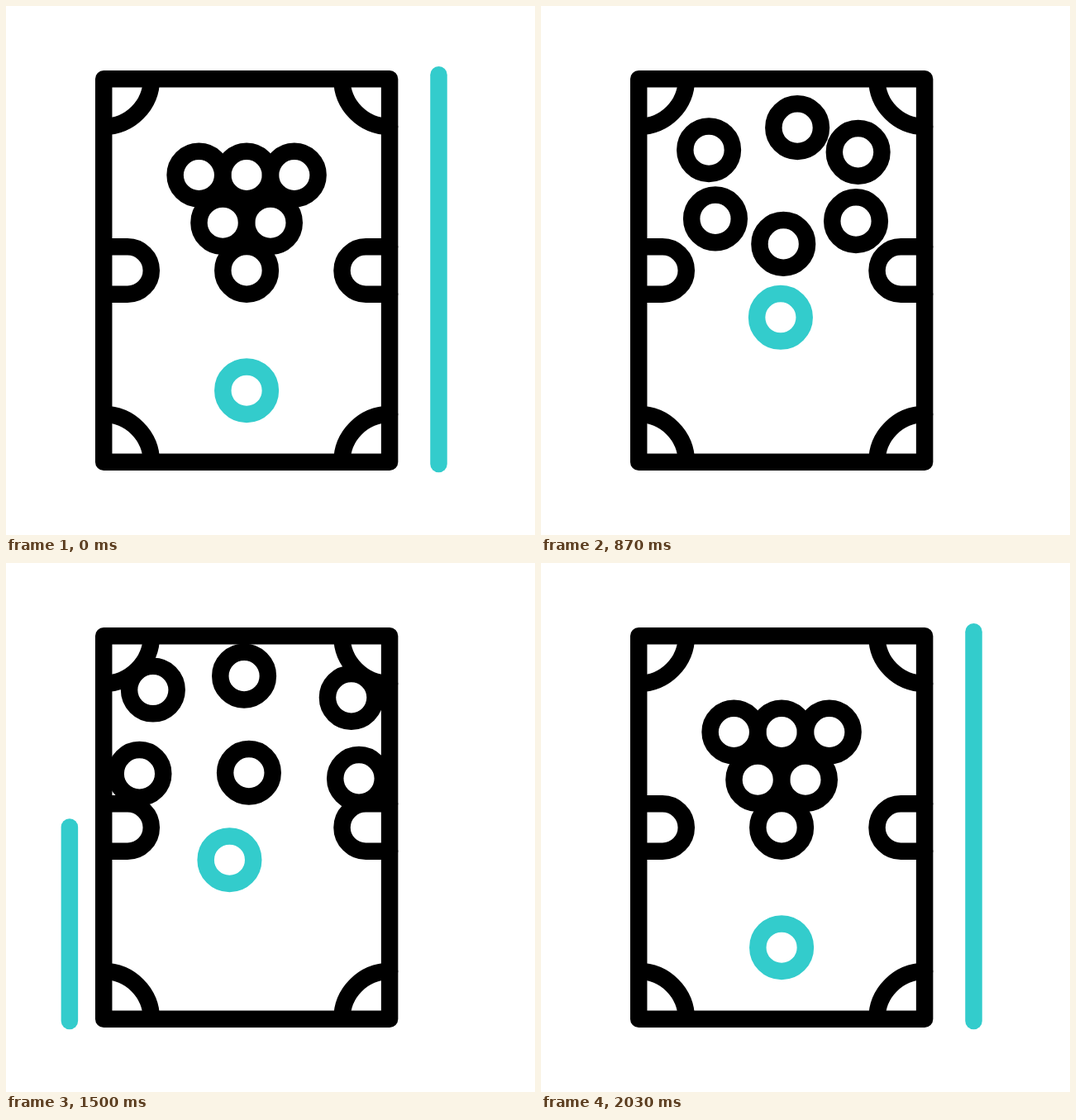
These frames come from a looping animation (640x640 px, 2.07 s). An HTML page with a canvas:

```html
<!DOCTYPE html>
<html lang="en">
<head>
<meta charset="utf-8">
<title>Billiard table</title>
<style>
html, body { margin: 0; width: 100%; height: 100%; overflow: hidden; background: #fff; }
canvas { display: block; width: 100vmin; height: 100vmin; margin: auto; }
</style>
</head>
<body>
<canvas id="stage"></canvas>
<script>
const canvas = document.getElementById('stage');
const ctx = canvas.getContext('2d');
const SIZE = 640, LOOP = 2070, LAST = 61;
const BLACK = '#000', TEAL = '#33cccc';
const LINE = 20.5, BALL_R = 28.8, PITCH = 57.7;
const LEFT = 118.2, RIGHT = 464.1, TOP = 88.3, BOTTOM = 551.7, MIDDLE = 320;
const CUE_TOP = 83.2, CUE_BOTTOM = 554.1, CUE_LEFT = 76.9, CUE_RIGHT = 523.5;
const RAIL = TOP + BALL_R + LINE / 2;
const LAG = 0.015;

const mix = (a, b, p) => a + (b - a) * p;
const mixPoint = (a, b, p) => [mix(a[0], b[0], p), mix(a[1], b[1], p)];
const bend = (a, b, c, p) => mixPoint(mixPoint(a, b, p), mixPoint(b, c, p), p);
const clamp = v => Math.min(1, Math.max(0, v));
const ease = v => (1 - Math.cos(Math.PI * clamp(v))) / 2;

// Racked balls, top row first
const rack = [];
for (let row = 0; row < 3; row++) {
  for (let i = 0; i < 3 - row; i++) {
    rack.push([291.1 + (i - (2 - row) / 2) * PITCH, 204.5 + row * PITCH]);
  }
}

// Where each ball bends towards, and where it would stop without the rail
const rolls = [
  { via: [202, 170.5], end: [176, 152.2] },
  { via: [332.4, 134.5], end: [284.8, 116.7] },
  { via: [382, 170.7], end: [420.5, 162.2] },
  { via: [213, 256.4], end: [157.5, 254.8] },
  { via: [386, 258.7], end: [430.2, 261] },
  { via: [294, 291], end: [293.9, 250.9] }
];

function ballAt(i, n) {
  const p = ease(Math.pow(clamp((n - 13) / 39.4), 0.62));
  const [x, y] = bend(rack[i], rolls[i].via, rolls[i].end, p);
  return [x, y < RAIL ? 2 * RAIL - y : y];
}

function cueBallAt(n) {
  const hit = [293.3, 382.5];
  if (n < 14.4) return mixPoint([291.1, 465.2], hit, ease((n - 8.8) / 5.6));
  return bend(hit, [284, 364.4], [262, 355], ease((n - 14.4) / 43.6));
}

function stroke(color, draw) {
  ctx.strokeStyle = color;
  ctx.beginPath();
  draw();
  ctx.stroke();
}

function drawTable() {
  const quarter = Math.PI / 2;
  stroke(BLACK, () => ctx.rect(LEFT, TOP, RIGHT - LEFT, BOTTOM - TOP));
  [[LEFT, TOP], [RIGHT, TOP], [RIGHT, BOTTOM], [LEFT, BOTTOM]].forEach(([x, y], i) =>
    stroke(BLACK, () => ctx.arc(x, y, PITCH, i * quarter, (i + 1) * quarter)));
  [[LEFT, 1], [RIGHT, -1]].forEach(([x, dir]) => stroke(BLACK, () => {
    ctx.moveTo(x, MIDDLE - BALL_R);
    ctx.arc(x + dir * BALL_R, MIDDLE, BALL_R, -quarter, quarter, dir < 0);
    ctx.lineTo(x, MIDDLE + BALL_R);
  }));
}

function ring([x, y], color) {
  stroke(color, () => ctx.arc(x, y, BALL_R, 0, 2 * Math.PI));
}

function drawBalls(n, from, to) {
  ctx.save();
  ctx.beginPath();
  ctx.rect(from, 0, to - from, SIZE);
  ctx.clip();
  rack.forEach((_, i) => ring(ballAt(i, n), BLACK));
  ring(cueBallAt(n), TEAL);
  ctx.restore();
}

function drawCue(x, top) {
  if (top > CUE_BOTTOM - 0.1) return;
  stroke(TEAL, () => {
    ctx.moveTo(x, top);
    ctx.lineTo(x, CUE_BOTTOM);
  });
}

function render(n) {
  const scale = canvas.width / SIZE;
  ctx.setTransform(scale, 0, 0, scale, 0, 0);
  ctx.fillStyle = '#fff';
  ctx.fillRect(0, 0, SIZE, SIZE);
  ctx.lineWidth = LINE;
  ctx.lineCap = ctx.lineJoin = 'round';
  drawTable();

  if (n < 39) {
    drawBalls(n, 0, SIZE);
    drawCue(CUE_RIGHT, mix(CUE_TOP, CUE_BOTTOM, ease(n / 11.85)));
    return;
  }
  // The returning cue wipes the table back to the racked state
  const x = mix(CUE_LEFT, CUE_RIGHT, ease((n - 47 - LAG) / 14));
  drawBalls(0, 0, x);
  drawBalls(n, x, SIZE);
  drawCue(x, mix(CUE_BOTTOM, CUE_TOP, ease((n - 39 - LAG) / 12)));
}

function resize() {
  const side = Math.min(innerWidth, innerHeight) || SIZE;
  canvas.width = canvas.height = Math.round(side * (devicePixelRatio || 1));
}

let start = null;
function tick(now) {
  if (start === null) start = now;
  const t = Math.max(0, now - start) % LOOP;
  // 30 steps a second, on a 10 ms grid
  render(Math.min(LAST, Math.floor((Math.floor(t / 10) + 0.5) * 0.3)));
  requestAnimationFrame(tick);
}

addEventListener('resize', resize);
resize();
render(0);
requestAnimationFrame(tick);
</script>
</body>
</html>
```
